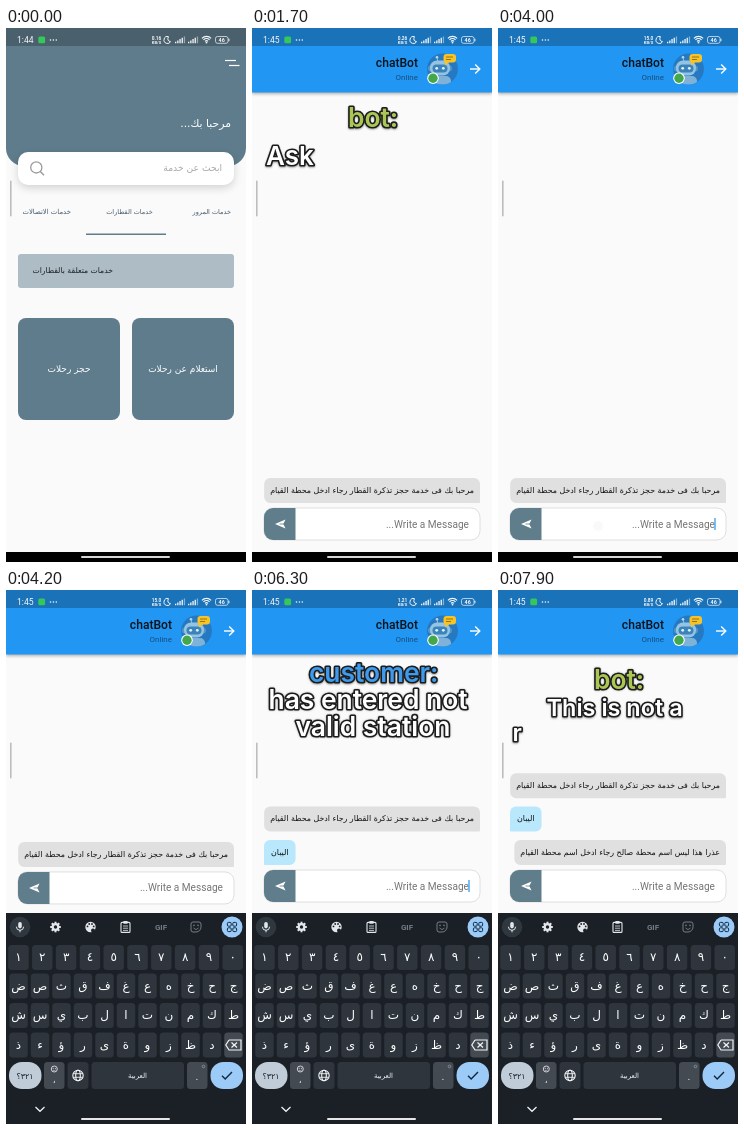
Write an HTML page with a canvas that moves like this. It is 240x534 px and loops after 8000 ms.

```html
<!DOCTYPE html>
<html lang="ar">
<head>
<meta charset="utf-8">
<title>Chat booking demo</title>
<style>
html, body { margin: 0; width: 100%; height: 100%; overflow: hidden; background: #fafafa; }
canvas { display: block; width: 240px; height: 534px; }
</style>
</head>
<body>
<canvas id="stage"></canvas>
<script>
const W = 240, H = 534, LOOP = 8000;
const canvas = document.getElementById('stage');
const ctx = canvas.getContext('2d');
const ratio = Math.max(1, window.devicePixelRatio || 1);
canvas.width = W * ratio;
canvas.height = H * ratio;

const ROBOTO = "Roboto, sans-serif";
const INTER = "Inter, sans-serif";
const ARABIC = "'DejaVu Sans', sans-serif";
const SLATE = '#5f7c8c';

const OPEN_CHAT = 1000, FOCUS = 3950, KEYBOARD = 4050, SEND = 6200, REPLY = 6900;
const WORD = 'اليبان';
const KEY_TIMES = [4900, 5200, 5500, 5700, 5850, 6000];
const SUGGESTIONS = [
  ['انا', 'ان'], ['الصورة', 'آل'], ['اليوم', 'إلى'],
  ['البيت', 'اليه'], ['اليابان', 'البيان'], ['اليابان', 'البيان']
];
const SPEEDS = [[0, '0.16'], [1500, '0.26'], [3100, '15.0'], [5900, '1.21'], [7500, '0.89']];
const MESSAGES = [
  { at: 0, text: 'مرحبا بك فى خدمة حجز تذكرة القطار رجاء ادخل محطة القيام' },
  { at: SEND, text: WORD, mine: true },
  { at: REPLY, text: 'عذرا هذا ليس اسم محطة صالح رجاء ادخل اسم محطة القيام' }
];
const BOT = '#aac653', CUSTOMER = '#3d9aec';
const CAPTIONS = [
  { from: 1350, type: 1570, out: 3250, title: 'bot:', color: BOT, titleX: 96, titleY: 99, size: 26,
    lines: [['Ask to enter the', 14, 137], ['from station', 44, 165]] },
  { from: 4600, type: 4830, out: 6650, title: 'customer:', color: CUSTOMER, titleX: 57, titleY: 92, size: 26.4,
    lines: [['has entered not', 16.5, 118.5], ['valid station', 43.5, 145.5]] },
  { from: 7130, type: 7310, out: 9000, title: 'bot:', color: BOT, titleX: 96, titleY: 98.5, size: 23.5,
    lines: [['This is not a', 48.5, 126], ['registered station', 14.5, 151]] }
];
const CHAR_TIME = 42;

const clamp = v => Math.max(0, Math.min(1, v));
const span = (t, a, b) => clamp((t - a) / (b - a));
const easeOut = (p, n) => 1 - Math.pow(1 - p, n);

function box(x, y, w, h, r, fill, stroke, width = 0.7) {
  ctx.beginPath();
  ctx.roundRect(x, y, w, h, r);
  if (fill) { ctx.fillStyle = fill; ctx.fill(); }
  if (stroke) { ctx.strokeStyle = stroke; ctx.lineWidth = width; ctx.stroke(); }
}

function disc(x, y, r, fill) {
  ctx.beginPath();
  ctx.arc(x, y, r, 0, Math.PI * 2);
  ctx.fillStyle = fill;
  ctx.fill();
}

function arc(x, y, r, from, to, color, width = 1) {
  ctx.beginPath();
  ctx.arc(x, y, r, from, to);
  ctx.strokeStyle = color;
  ctx.lineWidth = width;
  ctx.stroke();
}

const ring = (x, y, r, color, width) => arc(x, y, r, 0, Math.PI * 2, color, width);

function trace(pts) {
  ctx.beginPath();
  for (let i = 0; i < pts.length; i += 2) ctx.lineTo(pts[i], pts[i + 1]);
}

function line(color, width, ...pts) {
  trace(pts);
  ctx.strokeStyle = color;
  ctx.lineWidth = width;
  ctx.stroke();
}

function poly(color, ...pts) {
  trace(pts);
  ctx.fillStyle = color;
  ctx.fill();
}

function label(s, x, y, size, color, align = 'left', weight = 400) {
  ctx.font = `${weight} ${size}px ${ROBOTO}`;
  ctx.textAlign = align;
  ctx.direction = 'ltr';
  ctx.fillStyle = color;
  ctx.fillText(s, x, y);
}

function arabic(s, x, y, size, color, align = 'right', family = ARABIC) {
  ctx.font = `${size}px ${family}`;
  ctx.textAlign = align;
  ctx.direction = 'rtl';
  ctx.fillStyle = color;
  ctx.fillText(s, x, y);
}

function withShadow(color, blur, dy, draw) {
  ctx.save();
  ctx.shadowColor = color;
  ctx.shadowBlur = blur * ratio;
  ctx.shadowOffsetY = dy * ratio;
  draw();
  ctx.restore();
}

function statusBar(t) {
  const white = '#f4f7f9';
  label(t < OPEN_CHAT ? '1:44' : '1:45', 11, 15, 8.6, white);
  box(32.3, 8.5, 6.8, 6.8, 1.5, '#35c759');
  for (let i = 0; i < 3; i++) disc(44.5 + i * 2.9, 12, 0.8, white);
  const speed = SPEEDS.filter(s => s[0] <= t).pop()[1];
  label(speed, 150.5, 11.6, 4.8, white, 'center', 700);
  label('KB/S', 150.5, 16, 4.2, white, 'center', 700);

  ctx.beginPath();
  ctx.arc(161.5, 12, 3.5, -1.3, 0.5, true);
  ctx.quadraticCurveTo(160.6, 13, 162.4, 8.6);
  ctx.strokeStyle = white;
  ctx.lineWidth = 1;
  ctx.stroke();
  for (const x of [169, 182]) {
    for (let i = 0; i < 5; i++) {
      const h = 1.5 + i * 1.3;
      box(x + i * 2.2, 15.2 - h, 1.3, h, 0, i < 4 ? white : 'rgba(255,255,255,.45)');
    }
  }
  for (let i = 1; i <= 3; i++) arc(200.5, 15, i * 2.2, -2.35, -0.79, white, 1.1);
  disc(200.5, 14.6, 0.9, white);
  box(209.5, 8.5, 12.5, 6.8, 2, null, white);
  box(222.4, 10.6, 1, 2.6, 0.5, white);
  label('46', 215.7, 13.9, 5.4, white, 'center', 700);
}

function sideHandle() {
  box(4, 152.5, 1.6, 36, 0.8, '#bdbdbd');
}

function navBar() {
  box(0, 524, W, 10, 0, '#000');
  box(75, 528, 89, 2, 1, '#d6d6d6');
}

function home(t) {
  box(0, 0, W, H, 0, '#fafafa');
  box(0, 0, W, 138, [0, 0, 18, 18], SLATE);
  box(0, 0, W, 18, 0, '#4a616d');
  line('#fff', 1.2, 219, 32.5, 230, 32.5);
  line('#fff', 1.2, 223, 37.5, 233.5, 37.5);
  arabic('مرحبا بك...', 225, 99, 10.8, '#fff');

  withShadow('rgba(0,0,0,.16)', 8, 3, () => box(12, 124, 216, 33, 10, '#fff'));
  ring(30.3, 139.4, 5.6, '#9a9a9a', 1.3);
  line('#9a9a9a', 1.4, 34.3, 143.4, 38, 147.2);
  arabic('ابحث عن خدمة', 216, 143, 9.2, '#a9a9a9');
  sideHandle();

  arabic('خدمات المرور', 225, 186, 6.5, '#46596a');
  arabic('خدمات القطارات', 123.5, 186, 6.5, '#46596a', 'center');
  arabic('خدمات الاتصالات', 65, 186, 6.9, '#46596a');
  box(80, 205.5, 80, 1.5, 0, '#607d8b');

  box(12, 226, 216, 34, 3, '#adbcc5');
  arabic('خدمات متعلقة بالقطارات', 107, 245, 7.7, '#1d2327');

  for (const [x, name] of [[12, 'حجز رحلات'], [126, 'استعلام عن رحلات']]) {
    box(x, 290, 102, 102, 8, SLATE);
    if (x === 12 && t > 850) {
      ctx.save();
      box(x, 290, 102, 102, 8);
      ctx.clip();
      disc(63, 341, 70 * span(t, 850, 1100), 'rgba(255,255,255,.12)');
      ctx.restore();
    }
    arabic(name, x + 51, 344, 9, '#fff', 'center');
  }
}

function avatar() {
  disc(190.5, 41, 15.4, '#2679c0');
  ctx.save();
  ctx.beginPath();
  ctx.arc(190.5, 41, 15.4, 0, Math.PI * 2);
  ctx.clip();
  box(181, 48, 18, 12, 5, '#7fb2d8');
  ctx.restore();
  line('#8fc0e0', 1, 186, 34, 185, 29.5);
  disc(185, 29.3, 1.3, '#b5d8ee');
  box(176, 37.5, 24, 6, 3, '#4f98cc');
  box(178, 32.5, 20, 15, 7, '#95c4e2');
  box(180.5, 36.5, 15, 8, 4, '#3b83ba');
  disc(184.7, 40.3, 1.4, '#dff4ff');
  disc(191.3, 40.3, 1.4, '#dff4ff');
  box(191.5, 26, 12.5, 8.5, 3, '#f7c325');
  poly('#f7c325', 193, 33, 193, 37.5, 198, 33.5);
  line('#8c6d18', 0.9, 194, 29, 201, 29);
  line('#8c6d18', 0.9, 194, 31.5, 199, 31.5);
  disc(181, 50.2, 5.8, '#fff');
  disc(181, 50.2, 4.7, '#43a84b');
}

function appBar() {
  withShadow('rgba(0,0,0,.3)', 3, 1, () => box(0, 0, W, 64.5, 0, '#2196f3'));
  box(0, 0, W, 18, 0, '#1a72b9');
  label('chatBot', 166, 39, 12.1, '#0b1218', 'right', 500);
  label('Online', 166, 52, 8, '#174f80', 'right');
  avatar();
  line('#fff', 1.4, 218, 41, 227.5, 41);
  line('#fff', 1.4, 223.2, 36.4, 227.8, 41, 223.2, 45.6);
}

function bubbles(t, bottom) {
  const shown = MESSAGES.filter(m => t >= m.at);
  shown.reverse().forEach((m, i) => {
    const y = bottom - i * 33.4, size = 7.9;
    ctx.font = `${size}px ${ARABIC}`;
    const w = Math.min(216, ctx.measureText(m.text).width + (m.mine ? 14 : 12));
    const x = m.mine ? 12 : 228 - w;
    box(x, y, w, 25, m.mine ? [6, 6, 6, 1] : [6, 6, 1, 6], m.mine ? '#b9e7fc' : '#e0e0e0');
    arabic(m.text, x + w - (m.mine ? 7 : 6), y + 14.8, size, '#111');
  });
}

function typedCount(t) {
  return t >= SEND ? 0 : KEY_TIMES.filter(k => k <= t).length;
}

function inputField(t, y) {
  box(12, y, 216, 32, 9, '#fff', '#d2d2d2');
  box(12, y, 31.5, 32, [9, 0, 0, 9], '#607d8b');
  poly('#fff', 33.5, y + 11.5, 23, y + 16, 33.5, y + 20.5, 31.3, y + 16);
  line('#607d8b', 0.8, 32.5, y + 16, 27.5, y + 16);
  if (t > 3900 && t < 4150) disc(100, y + 18, 5, 'rgba(0,0,0,.025)');

  const value = WORD.slice(0, typedCount(t));
  let caret = 217;
  if (value) {
    arabic(value, 217, y + 19, 9.4, '#222');
    caret -= ctx.measureText(value).width + 1;
  } else {
    arabic('Write a Message...', 217, y + 19.5, 10.1, '#757575', 'right', ROBOTO);
  }
  const reset = [3650, ...KEY_TIMES, SEND].filter(k => k <= t).pop();
  if (t >= FOCUS && (t - reset) % 1000 < 500) box(caret - 0.6, y + 10, 1.2, 12, 0, '#2196f3');
}

function toolbar(t, y) {
  const ink = '#e3e7ec', dim = '#747c86';
  disc(14, y, 10.3, '#2f373f');
  box(12.2, y - 5, 3.6, 6.4, 1.8, ink);
  arc(14, y - 0.3, 3.6, 0, Math.PI, ink);
  line(ink, 1, 14, y + 3, 14, y + 5.3);

  disc(226, y, 10.5, '#9ccbf8');
  for (const dx of [-4.6, 0.8]) for (const dy of [-4.6, 0.8]) {
    box(226 + dx, y + dy, 3.8, 3.8, 1, null, '#0f2942', 1);
  }

  const n = typedCount(t);
  if (n) {
    const [left, middle] = SUGGESTIONS[n - 1];
    [[left, 57], [middle, 120], [WORD.slice(0, n), 183]].forEach(([s, x]) =>
      arabic(s, x, y + 3, 9.7, ink, 'center'));
    line('#444c55', 0.8, 88, y - 6, 88, y + 6);
    line('#444c55', 0.8, 152, y - 6, 152, y + 6);
    return;
  }
  for (let i = 0; i < 8; i++) {
    const a = i * Math.PI / 4;
    line(ink, 2, 49.5, y, 49.5 + 5.3 * Math.cos(a), y + 5.3 * Math.sin(a));
  }
  disc(49.5, y, 3.9, ink);
  disc(49.5, y, 1.7, '#1a2028');
  disc(84.5, y, 5.2, ink);
  for (const [dx, dy] of [[-3, -0.6], [-1.3, -3], [1.5, -3], [3.2, -0.6]]) disc(84.5 + dx, y + dy, 0.9, '#1a2028');
  disc(87, y + 3.6, 2, '#1a2028');
  box(115, y - 4.6, 9, 10, 1, null, ink, 1.1);
  box(117.4, y - 6, 4.2, 2.8, 0.6, ink);
  for (const dy of [-1, 1.2, 3.4]) line(ink, 0.8, 117, y + dy, 122, y + dy);
  label('GIF', 155, y + 3, 8, dim, 'center', 700);
  box(185, y - 5, 10, 10, [2, 2, 5, 2], null, dim, 1);
  disc(188, y - 1.6, 0.8, dim);
  disc(192, y - 1.6, 0.8, dim);
  line(dim, 0.9, 187.5, y + 1, 190, y + 2.6, 192.5, y + 1);
}

const KEY = '#2e353c', SIDE_KEY = '#434a52';

function keyRow(keys, y, t, pitch, width) {
  const pressed = KEY_TIMES.findIndex(k => t >= k && t < k + 100);
  [...keys].forEach((k, i) => {
    const x = 12.5 + i * pitch;
    const active = pressed >= 0 && WORD[pressed] === k;
    box(x - width / 2, y, width, 25, 3.5, active ? '#525b65' : k === '<' ? SIDE_KEY : KEY);
    if (k !== '<') arabic(k, x, y + 16, 12, '#fff', 'center');
  });
}

function keyboard(t, top) {
  const ink = '#f2f4f6';
  ctx.save();
  ctx.translate(0, top - 324);
  box(0, 323, W, 211, 0, '#1a2026');
  toolbar(t, 337);
  keyRow('١٢٣٤٥٦٧٨٩٠', 355, t, 23.8, 20.5);
  keyRow('ضصثقفغعهخحج', 383.5, t, 21.5, 18.5);
  keyRow('شسيبلاتنمكط', 413, t, 21.5, 18.5);
  keyRow('ذءؤرىةوزظد<', 442.5, t, 21.5, 18.5);
  line(ink, 1.2, 223, 450, 235, 450, 235, 460, 223, 460, 219.8, 455, 223, 450);
  line(ink, 1.2, 225.5, 452.5, 231, 457.5);
  line(ink, 1.2, 231, 452.5, 225.5, 457.5);

  box(3, 472, 32.5, 27, 13, '#c1ccd9');
  arabic('٣٢١؟', 19, 488.5, 8, '#1a242e', 'center');
  box(38, 472, 20.5, 27, 3.5, SIDE_KEY);
  ring(48.3, 479, 3, ink, 0.8);
  disc(47.2, 478.3, 0.5, ink);
  disc(49.4, 478.3, 0.5, ink);
  line(ink, 0.6, 47, 480, 48.3, 480.8, 49.6, 480);
  arabic('،', 48.3, 493, 9, ink, 'center');
  box(61.5, 472, 21, 27, 3.5, KEY);
  ring(72, 485.5, 5.2, ink, 1.1);
  ctx.beginPath();
  ctx.ellipse(72, 485.5, 2.3, 5.2, 0, 0, Math.PI * 2);
  ctx.stroke();
  line(ink, 0.9, 67.5, 483.7, 76.5, 483.7);
  line(ink, 0.9, 67.5, 487.3, 76.5, 487.3);
  box(85.5, 472, 92.5, 27, 3.5, KEY);
  arabic('العربية', 131.5, 488, 7, ink, 'center');
  box(181, 472, 20.5, 27, 3.5, SIDE_KEY);
  label('.', 191, 490, 11, ink, 'center');
  ring(197.5, 476.5, 1.3, '#a8afb7', 0.6);
  box(204.5, 472, 32.5, 27, 13, '#9ccbf8');
  line('#0f2942', 1.4, 216, 485.8, 219.2, 489, 226, 482);

  line(ink, 1.2, 29.5, 517, 34, 521.3, 38.5, 517);
  box(75, 528, 89, 2, 1, '#e6e6e6');
  ctx.restore();
}

function chat(t, rise) {
  box(0, 0, W, H, 0, '#fafafa');
  sideHandle();
  bubbles(t, 450 - 200 * rise);
  inputField(t, 480 - 200 * rise);
  appBar();
}

function outlined(s, x, y, size, color) {
  ctx.font = `600 ${size}px ${INTER}`;
  ctx.textAlign = 'left';
  ctx.direction = 'ltr';
  ctx.lineJoin = 'round';
  ctx.lineWidth = 3.2;
  ctx.strokeStyle = '#1c1c1c';
  withShadow('rgba(0,0,0,.4)', 2, 0.5, () => ctx.strokeText(s, x, y));
  ctx.fillStyle = color;
  ctx.fillText(s, x, y);
}

function caption(c, t) {
  const visible = span(t, c.from, c.from + 150) * (1 - span(t, c.out, c.out + 400));
  if (!visible) return;
  ctx.save();
  ctx.globalAlpha = visible;
  outlined(c.title, c.titleX, c.titleY, 26.4, c.color);
  let left = t < c.type ? 0 : Math.floor((t - c.type) / CHAR_TIME) + 1;
  for (const [text, x, y] of c.lines) {
    if (left > 0) outlined(text.slice(0, left), x, y, c.size, '#fff');
    left -= text.length + 1;
  }
  ctx.restore();
}

function render(t) {
  ctx.setTransform(ratio, 0, 0, ratio, 0, 0);
  const enter = easeOut(span(t, OPEN_CHAT, OPEN_CHAT + 300), 2);
  const rise = easeOut(span(t, KEYBOARD, KEYBOARD + 250), 5);
  if (enter < 1) home(t);
  if (enter > 0) {
    ctx.save();
    ctx.globalAlpha = enter;
    ctx.translate(0, 90 * (1 - enter));
    chat(t, rise);
    ctx.restore();
  }
  statusBar(t);
  navBar();
  if (rise > 0) keyboard(t, H - 210 * Math.min(1, rise * 1.011));
  CAPTIONS.forEach(c => caption(c, t));
}

const start = performance.now();
function tick() {
  render((performance.now() - start) % LOOP);
  requestAnimationFrame(tick);
}
tick();
</script>
</body>
</html>
```
